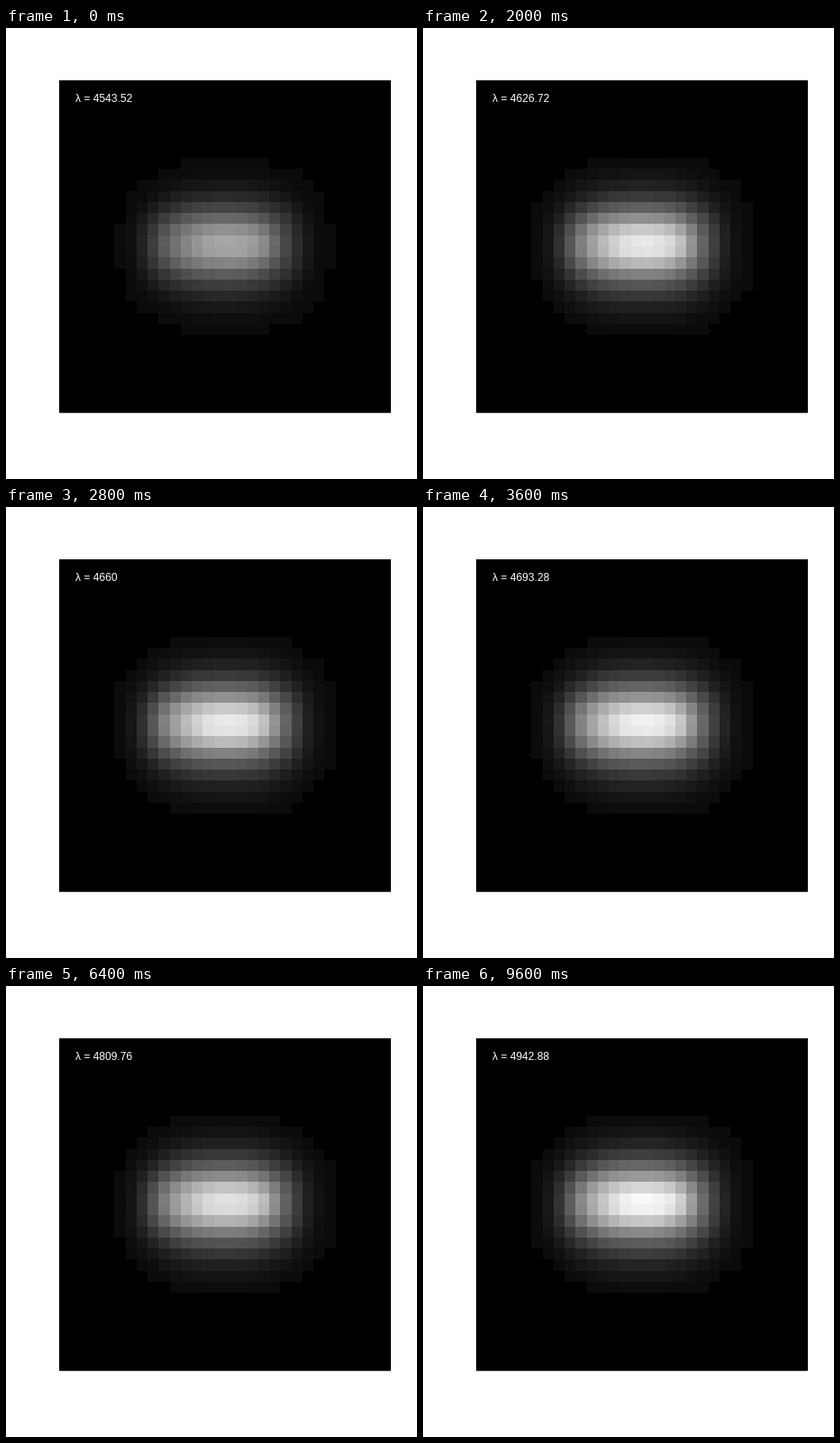
Write a matplotlib script that moves like this. It is 456 px wide and 500 px high and loops after 10 s.

```python
import numpy as np
import matplotlib.pyplot as plt
from matplotlib.animation import FuncAnimation
from matplotlib.patches import Rectangle

W, H, DPI = 456, 500, 100
FRAMES, STEP_MS = 25, 400
CELLS = 30
LEFT, TOP, SIDE = 58.8, 58.8, 367.5

# Isophotes: half-widths in cells, by relative brightness
LEVEL = [.026, .045, .07, .1, .15, .25, .4, .6, .8, .92, 1]
WEST = [10.4, 9.8, 9.15, 8.6, 8.1, 7.35, 6.5, 5.35, 3.5, 2.2, 0]
EAST = [10.2, 9.4, 8.4, 7.8, 7.2, 6.4, 5.4, 4.4, 3.4, 2.3, 0]
NORTH = [8.3, 7.6, 6.75, 6.0, 5.25, 4.3, 3.35, 2.35, 1.55, 1.0, 0]
SOUTH = [8.6, 8.0, 7.15, 6.4, 5.5, 4.5, 3.35, 2.35, 1.55, .9, 0]
CENTER_X, CENTER_Y, POWER = 14.7, 14.35, 2.4

# Peak brightness of each wavelength slice
PEAK = [165, 183, 186, 205, 217, 230, 262, 231, 215, 238, 220, 240, 240,
        240, 240, 240, 223, 223, 233, 233, 254, 246, 246, 246, 246]


def galaxy():
    levels = np.linspace(0.002, 0.998, 499)
    west, east, north, south = (
        np.interp(levels, LEVEL, half)[:, None, None]
        for half in (WEST, EAST, NORTH, SOUTH))
    rows, cols = np.mgrid[:CELLS, :CELLS]
    dx, dy = cols - CENTER_X, rows - CENTER_Y
    u = np.abs(dx) / np.where(dx < 0, west, east)
    v = np.abs(dy) / np.where(dy < 0, north, south)
    return (u ** POWER + v ** POWER < 1).mean(axis=0)


SHAPE = galaxy()


def cells(i):
    value = np.clip(SHAPE * PEAK[i] * 1.04, 0, 255)
    return np.where(value < 7, 0, np.maximum(value, 11))


def label(i):
    wavelength = f"{4543.52 + 16.64 * i:.2f}".rstrip("0").rstrip(".")
    return f"λ = {wavelength}"


# The small margin keeps the pixel size from rounding down
fig = plt.figure(figsize=((W + 0.01) / DPI, (H + 0.01) / DPI), dpi=DPI,
                 facecolor="white")
ax = fig.add_axes([0, 0, 1, 1])
ax.axis("off")
ax.add_patch(Rectangle((LEFT, TOP), SIDE, SIDE, fc="black", ec="#26302c",
                       lw=0.5))
image = ax.imshow(cells(0), cmap="gray", vmin=0, vmax=255, aspect="auto",
                  interpolation="nearest", zorder=2,
                  extent=(LEFT, LEFT + SIDE, TOP + SIDE, TOP))
ax.set_xlim(0, W)
ax.set_ylim(H, 0)
text = ax.text(76.7, 82, label(0), color="white", family="Liberation Sans",
               size=12 * 72 / DPI, ha="left", va="baseline", zorder=3)


def update(i):
    image.set_data(cells(i))
    text.set_text(label(i))
    return image, text


anim = FuncAnimation(fig, update, frames=FRAMES, interval=STEP_MS,
                     repeat=True, repeat_delay=0)
plt.show()
```
